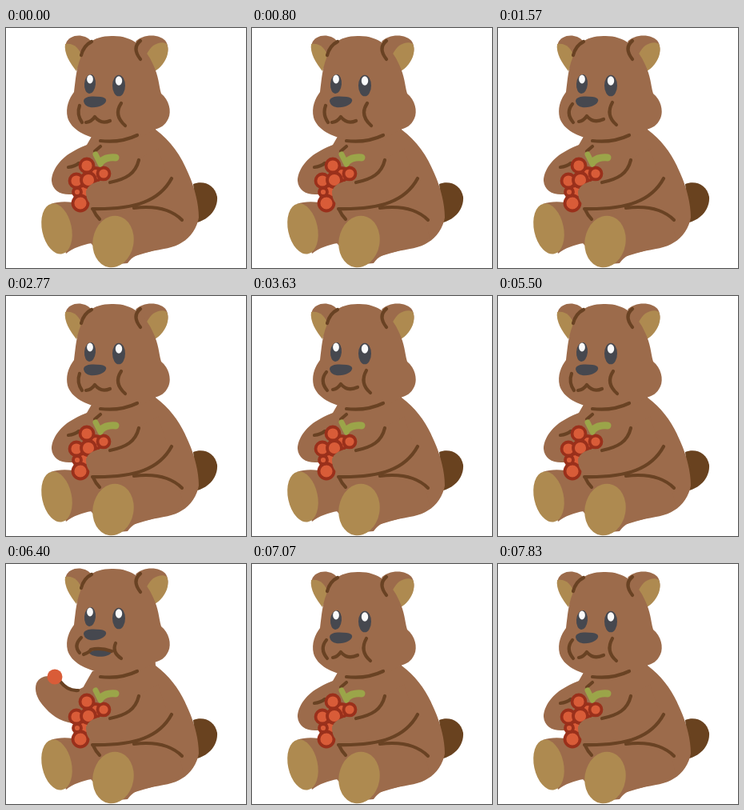
An HTML page that plays this animation: 300 by 300 pixels, repeating every 7910 ms.

```html
<!DOCTYPE html>
<html lang="en">
<head>
<meta charset="utf-8">
<title>Bear eating berries</title>
<style>
html, body { margin: 0; width: 100%; height: 100%; overflow: hidden; background: #fff; }
svg { display: block; width: 100vw; height: 100vh; }
.fur { fill: #9c6b4b; }
.tan { fill: #ae8a50; }
.slate { fill: #46484f; }
.line { fill: none; stroke: #694223; stroke-width: 4.2; stroke-linecap: round; stroke-linejoin: round; }
.berry { fill: #d95c38; }
.bunch circle { fill: #d95c38; stroke: #9a301b; stroke-width: 3.8; }
.leaf { fill: none; stroke: #9ba549; stroke-linecap: round; stroke-linejoin: round; }
</style>
</head>
<body>
<svg viewBox="0 0 300 300">
  <path fill="#69421f" d="M234,195C246,190 261,195 264,211C265,226 254,239 239,243Z"/>
  <path class="fur" d="M108,134C100,148 93,158 88,176L84,215L106,269L130,296L152,294C158,285 166,282 178,280C195,276 211,275 220,268C231,262 239,249 241,237C241,220 236,200 228,182C219,160 206,141 187,127L186,112Z"/>
  <path class="fur" d="M56,220C72,214 96,218 112,228L118,250L107,269C95,271 84,275 75,282Z"/>
  <ellipse class="tan" cx="63.500" cy="251" rx="18.500" ry="32" transform="rotate(-12 63.500 251)"/>

  <g id="armRest">
    <path class="fur" d="M120,139C106,144 92,149 81,156C67,164 57,179 57,191C58,203 68,209 82,208L94,205L122,180Z"/>
    <path class="line" d="M78,174Q86,173 91,169M111,154L118,148"/>
  </g>
  <g id="armReach">
    <path class="fur" d="M112,146C92,158 76,163 61,160C53,151 37,153 30,163C23,175 31,188 43,193C58,201 80,204 96,202L118,180Z"/>
    <path class="line" d="M61,160Q77,164 92,160"/>
    <circle class="berry" cx="45" cy="155" r="9"/>
  </g>
  <g id="armHold">
    <path class="fur" d="M116,141C104,149 94,158 85,157C77,155 73,149 68,145C57,137 43,139 38,149C34,161 42,173 50,181C59,191 72,199 91,200L118,180Z"/>
    <path class="line" d="M68,147Q77,159 90,158"/>
    <circle class="berry" cx="61" cy="141" r="9.500"/>
  </g>

  <g class="bunch">
    <circle cx="112" cy="183" r="8"/><circle cx="122" cy="182" r="7.500"/>
    <circle cx="101" cy="172" r="8.500"/><circle cx="97" cy="205" r="8"/>
    <circle cx="93" cy="219" r="9.500"/><circle cx="89" cy="205" r="5"/>
    <circle cx="88" cy="191" r="8.500"/><circle cx="103" cy="190" r="9"/>
  </g>
  <path class="leaf" stroke-width="7" d="M112,158L118,170"/>
  <path class="leaf" stroke-width="9" d="M119,167Q125,161 137,162"/>

  <path class="fur" d="M164,164C164,181 150,189 128,192C114,190 103,195 100,204C100,217 106,224 122,226C150,229 180,222 204,192L190,150Z"/>
  <path class="fur" d="M132,236C160,224 190,224 217,241L222,262C205,274 180,279 152,288Z"/>
  <path class="line" d="M166,165C162,182 150,189 130,193M207,188C192,216 162,227 108,226M160,225Q200,220 220,240M109,227Q112,234 117,239"/>
  <ellipse class="tan" cx="134" cy="267" rx="25.500" ry="32.500" transform="rotate(10 134 267)"/>

  <g id="head">
    <path class="fur" d="M92,52C82,44 72,29 75,19C79,8 97,6 106,16Z"/>
    <path class="tan" d="M88,54C80,44 72,31 74,20C84,18 92,25 95,36Z"/>
    <path class="fur" d="M162,17C171,7 193,7 200,17C207,29 198,46 184,53Z"/>
    <path class="tan" d="M175,50C171,40 176,29 184,22C190,18 197,17 201,20C206,31 198,47 186,54Z"/>
    <path class="fur" d="M93,38C96,22 108,10 132,10C156,9 174,22 184,46C191,60 191,72 194,82C204,90 207,104 203,113C199,122 193,125 185,127C170,139 144,146 118,140C100,135 82,128 77,112C74,99 79,88 85,80C87,64 88,50 93,38Z"/>
    <path class="line" d="M94,34Q97,22 107,17M168,16Q157,25 168,39"/>
    <g class="slate">
      <ellipse cx="105" cy="70" rx="7" ry="12" transform="rotate(5 105 70)"/>
      <ellipse cx="141" cy="72" rx="8" ry="13.300"/>
      <path d="M97,91C98,85 108,85 118,86C127,87 127,92 121,96C112,101 98,101 97,91Z"/>
    </g>
    <g fill="#fafafa">
      <ellipse cx="105" cy="64" rx="3.900" ry="5.400"/>
      <ellipse cx="141" cy="66" rx="4.200" ry="5.800"/>
    </g>
    <path id="open" class="slate" d="M104,115C112,109 125,110 132,114C130,121 108,122 104,115Z"/>
    <path id="mouth" class="line"/>
  </g>
  <path class="line" d="M118,141Q143,144 164,134"/>

  <g id="armBite">
    <path class="fur" d="M112,178L76,202C61,200 52,189 54,177C57,158 68,139 84,124C92,115 106,116 108,126C108,139 97,151 95,160Z"/>
    <path class="line" d="M108,127C107,141 97,149 95,159"/>
    <circle class="berry" cx="105" cy="116" r="8"/>
  </g>
</svg>
<script>
const LOOP = 7910, BAR = 1100, LEAD = 630;
const BEATS = [0, 100, 200, 330, 430, 530, 630, 760, 860, 960];
const SNACKS = [11, 21, 42, 57]; // step at which each reach begins
const STEPS = 72, PAUSE = 17;
const ARMS = ['Rest', 'Reach', 'Hold', 'Bite'];
const HEAD_Y = [0, -3, -4, -9];
const MOUTHS = [
  'M93,95Q84,106 94,118M101,117Q107,116 111,110Q119,120 132,114M143,93Q134,109 148,121',
  'M92,97Q88,108 95,118M100,118Q107,117 111,111Q119,121 130,116M144,94Q134,109 149,122'
];
const OPEN_MOUTH = 'M94,96Q84,106 92,115M97,117Q105,114 106,111Q118,108 132,113M137,103Q132,114 144,122';
const $ = id => document.getElementById(id);

function stepAt(t) {
  const bar = Math.floor((t + LEAD) / BAR), rest = (t + LEAD) % BAR;
  return bar * 10 + BEATS.filter(b => b <= rest).length - 7;
}

function draw(t) {
  const step = stepAt(t);
  const last = SNACKS.filter(s => s <= step).pop() ?? SNACKS.at(-1) - STEPS;
  const since = step - last;
  const pose = since < 3 ? since + 1 : 0;
  const chews = since - 3;
  const chew = (chews === PAUSE ? chews - 1 : chews) % 7 % 2;

  ARMS.forEach((name, i) => $('arm' + name).style.display = i === pose ? '' : 'none');
  $('open').style.display = pose ? '' : 'none';
  $('mouth').setAttribute('d', pose ? OPEN_MOUTH : MOUTHS[chew]);
  $('head').setAttribute('transform', `translate(0 ${HEAD_Y[pose]})`);
}

function tick(now) {
  draw(now % LOOP);
  requestAnimationFrame(tick);
}
draw(0);
requestAnimationFrame(tick);
</script>
</body>
</html>
```
